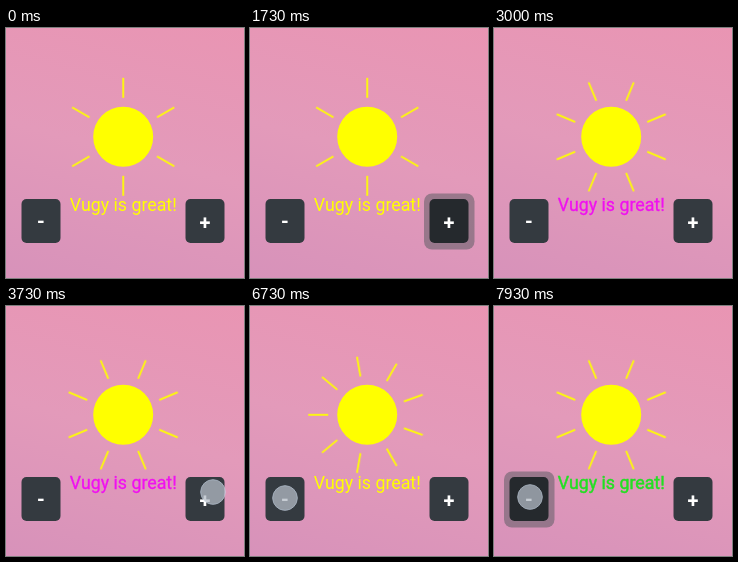
These frames come from a looping animation (238x250 px, 8000 ms). An HTML page:

```html
<!DOCTYPE html>
<html lang="en">
<head>
<meta charset="utf-8">
<title>Sun counter</title>
<style>
html, body { margin: 0; width: 100%; height: 100%; overflow: hidden; }
body { background: linear-gradient(195deg, #e995b3 0%, #e39aba 50%, #d792ba 100%); }
svg { display: block; width: 100vw; height: 100vh; }

svg * { animation-duration: 8s; animation-iteration-count: infinite; }
.hard, .rays, .label, .ring, .plus { animation-timing-function: step-end; }

.sun { fill: #ff0; }
.rays { stroke: #ff0; stroke-width: 1.8; opacity: 0; }
.label { font: 17.8px Roboto, Arial, sans-serif; text-anchor: middle; fill: #ff0; animation-name: tint; }
.key { fill: #343a40; }
.sign { font: bold 20px Roboto, Arial, sans-serif; text-anchor: middle; fill: #fff; }
.ring { fill: #52585d; fill-opacity: .5; opacity: 0; }
.plus { animation-name: plusKey; }
.minus { animation: minusKey 8s step-end infinite; }
#plusRing { animation-name: plusRing; }
#minusRing { animation-name: minusRing; }

#rays6 { animation-name: six; }
#rays7 { animation-name: seven; }
#rays8 { animation-name: eight; }
#rays9 { animation-name: nine; }

.spot { animation-name: place; }
.touch { fill: #b4bcc6; stroke: #c8d4e4; stroke-width: 1; opacity: 0; animation-name: tap; animation-timing-function: linear; }
.trace { fill: #17191c; opacity: 0; animation-name: trace; }

@keyframes six { 0% { opacity: 1 } 33.3%, 100% { opacity: 0 } }
@keyframes seven { 0% { opacity: 0 } 33.3% { opacity: 1 } 36.6%, 100% { opacity: 0 } }
@keyframes eight {
  0% { opacity: 0 } 36.6% { opacity: 1 } 50% { opacity: 0 }
  98.3%, 100% { opacity: 1 }
}
@keyframes nine { 0% { opacity: 0 } 50% { opacity: 1 } 98.3%, 100% { opacity: 0 } }
@keyframes tint {
  0% { fill: #ff0; stroke: none }
  33.3% { fill: #22e022; stroke: #22e022; stroke-width: .5px }
  36.6% { fill: #f010f0; stroke: #f010f0; stroke-width: .3px }
  50% { fill: #ff0; stroke: none }
  98.3%, 100% { fill: #22e022; stroke: #22e022; stroke-width: .5px }
}
@keyframes plusRing {
  0% { opacity: 0 } 16.6% { opacity: 1 } 36.6% { opacity: 0 }
  47.4% { opacity: 1 } 50% { opacity: 0 } 100% { opacity: 0 }
}
@keyframes plusKey {
  0% { fill: #343a40 } 16.6% { fill: #25292d } 36.6% { fill: #343a40 }
  47.4% { fill: #25292d } 50% { fill: #343a40 } 100% { fill: #343a40 }
}
@keyframes minusRing { 0% { opacity: 0 } 84.9%, 100% { opacity: 1 } }
@keyframes minusKey { 0% { fill: #343a40 } 84.9%, 100% { fill: #25292d } }
@keyframes place {
  0% { transform: translate(204px, 195px) }
  30% { transform: translate(206px, 203px) }
  45% { transform: translate(207px, 186px) }
  80% { transform: translate(35px, 192px) }
  95%, 100% { transform: translate(36px, 191px) }
}
@keyframes tap {
  0%, 15.82% { opacity: 0 } 15.83% { opacity: .75 } 17.5% { opacity: .65 } 21.4% { opacity: 0 }
  32.45% { opacity: 0 } 32.46% { opacity: .75 } 34.15% { opacity: .7 } 37.4% { opacity: 0 }
  46.57% { opacity: 0 } 46.58% { opacity: .75 } 48.3% { opacity: .65 } 51.4% { opacity: 0 }
  84.07% { opacity: 0 } 84.08% { opacity: .75 } 85.8% { opacity: .65 } 89% { opacity: 0 }
  97.45% { opacity: 0 } 97.46% { opacity: .8 } 100% { opacity: .72 }
}
@keyframes trace { 0% { opacity: 0 } 51% { opacity: .2 } 84.07%, 100% { opacity: 0 } }
</style>
</head>
<body>
<svg viewBox="0 0 238 250">
  <circle class="sun" cx="117.2" cy="108.8" r="30"/>
  <g id="sky" transform="translate(117.2 108.8)"></g>
  <text class="label" x="117.3" y="183">Vugy is great!</text>

  <rect class="ring" id="minusRing" x="10" y="165.5" width="50.5" height="56" rx="8"/>
  <rect class="key minus" x="15.5" y="171" width="39" height="44" rx="5"/>
  <text class="sign" x="35" y="200">-</text>

  <rect class="ring" id="plusRing" x="174" y="165.5" width="50.5" height="56" rx="8"/>
  <rect class="key plus" x="179.5" y="171" width="39" height="44" rx="5"/>
  <text class="sign" x="199" y="201">+</text>

  <circle class="trace hard" cx="206" cy="187" r="12"/>
  <g class="spot hard"><circle class="touch" r="12.3"/></g>
</svg>
<script>
const NS = 'http://www.w3.org/2000/svg';
const sky = document.getElementById('sky');

function add(parent, tag, attrs) {
  const el = document.createElementNS(NS, tag);
  for (const key in attrs) el.setAttribute(key, attrs[key]);
  return parent.appendChild(el);
}

// First ray angle per ray count, in degrees
const starts = { 6: 90, 7: 180, 8: 22.5, 9: 180 };
for (const n in starts) {
  const group = add(sky, 'g', { id: 'rays' + n, class: 'rays' });
  for (let i = 0; i < n; i++) {
    const turn = starts[n] + i * 360 / n;
    add(group, 'line', { x1: 39, x2: 59, transform: `rotate(${turn})` });
  }
}
</script>
</body>
</html>
```
